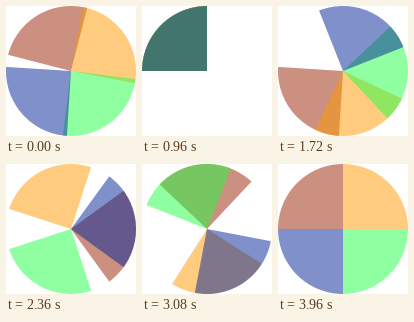
A matplotlib script that plays this animation: 130 by 130 pixels, repeating every 4000 ms.

```python
import matplotlib.pyplot as plt
from matplotlib.animation import FuncAnimation
from matplotlib.patches import Wedge

SIZE, DPI = 130, 100
FRAMES, INTERVAL = 100, 40

# (colour, start in degrees clockwise from the top, turns per loop), back to front
SECTORS = [
    ("#992200", 270, 4),
    ("#ff9900", 0, 3),
    ("#22ff44", 90, 2),
    ("#002299", 180, 1),
]

fig = plt.figure(figsize=(SIZE / DPI, SIZE / DPI), dpi=DPI, facecolor="white")
ax = fig.add_axes([0, 0, 1, 1])
ax.set_xlim(0, SIZE)
ax.set_ylim(0, SIZE)
ax.axis("off")

mid = SIZE / 2
wedges = [
    ax.add_patch(Wedge((mid, mid), mid, 0, 90, facecolor=colour, alpha=0.5,
                       edgecolor="none", linewidth=0, snap=False))
    for colour, _, _ in SECTORS
]


def draw(i):
    progress = (i + 1) / FRAMES
    for wedge, (_, start, turns) in zip(wedges, SECTORS):
        angle = (start + 360 * turns * progress) % 360
        wedge.set_theta1(-angle)
        wedge.set_theta2(90 - angle)
    return wedges


anim = FuncAnimation(fig, draw, frames=FRAMES, init_func=lambda: draw(0),
                     interval=INTERVAL, repeat=True, repeat_delay=0, blit=False)
plt.show()
```
